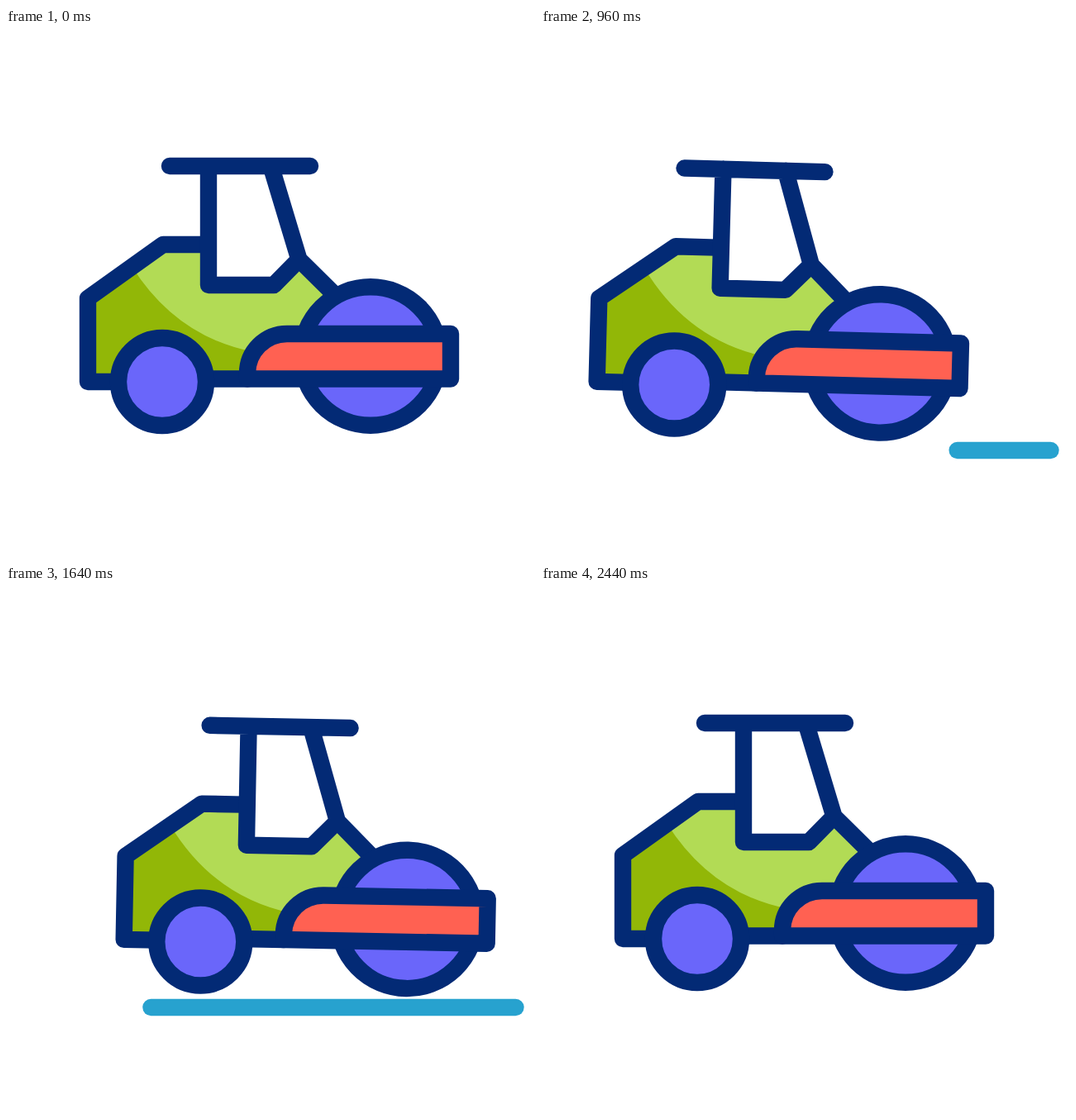
Recreate the animation shown at these times as an HTML page. Size 640x640 px, loop 2640 ms.

```html
<!DOCTYPE html>
<html lang="en">
<head>
<meta charset="utf-8">
<title>Road roller</title>
<style>
  html, body { margin: 0; width: 100%; height: 100%; overflow: hidden; background: #fff; }
  svg { display: block; width: 100%; height: 100%; }
  .line { stroke: #032a75; stroke-width: 20.4; stroke-linecap: round; stroke-linejoin: round; }
</style>
</head>
<body>
<svg viewBox="0 0 640 640" fill="none">
  <path id="road" stroke="#27a2cf" stroke-width="20.4" stroke-linecap="round"/>
  <g id="body">
    <path fill="#b2db55" d="M99 327L190 262H245V311H324L354.5 280L397 322L380 424H99Z"/>
    <path fill="#92b707" d="M99 327L152 288Q206 374 300 392V424H99Z"/>
    <g class="line">
      <path d="M240 262H190L99 327V428H140M240 424.5H292"/>
      <path d="M198 167H368M245 167V311H324L354.5 280L320.5 167M354.5 280L397 322"/>
      <circle cx="441" cy="397" r="83.7" fill="#6a66fa"/>
      <path fill="#ff6152" d="M292 424.5V418A48 48 0 0 1 340 370H538V424.5Z"/>
    </g>
  </g>
  <circle id="wheel" class="line" cx="189" cy="428" r="53" fill="#6a66fa"/>
</svg>
<script>
const LOOP = 2640;
const [road, body, wheel] = ['road', 'body', 'wheel'].map(id => document.getElementById(id));

// Keys are [time, value] pairs, eased in and out between neighbours.
const shiftX = [[0, 0], [440, -60.2], [1975, 61], [2440, 0]];
const shiftY = [[0, 0], [440, 3.5], [1975, 3.5], [2440, 0]];
const tilt = [[0, 0], [440, -3], [1040, 1.75], [1400, 1.75], [1975, 0]];
const roadLeft = [[520, 616.5], [1962, 111.5]];
const roadRight = [[1962, 616.5], [2440, 111.5]];

function valueAt(keys, t) {
  const next = keys.findIndex(([time]) => time > t);
  if (next < 0) return keys[keys.length - 1][1];
  if (next === 0) return keys[0][1];
  const [t0, a] = keys[next - 1], [t1, b] = keys[next];
  const u = (t - t0) / (t1 - t0);
  return a + (b - a) * u * u * (3 - 2 * u);
}

function draw(t) {
  const move = `translate(${valueAt(shiftX, t)} ${valueAt(shiftY, t)})`;
  wheel.setAttribute('transform', move);
  body.setAttribute('transform', `${move} rotate(${valueAt(tilt, t)} 235 290)`);

  const left = valueAt(roadLeft, t), right = valueAt(roadRight, t);
  road.setAttribute('d', right > left ? `M${left} 511H${right}` : '');
}

const start = performance.now();
function tick() {
  draw((performance.now() - start) % LOOP);
  requestAnimationFrame(tick);
}
tick();
</script>
</body>
</html>
```
